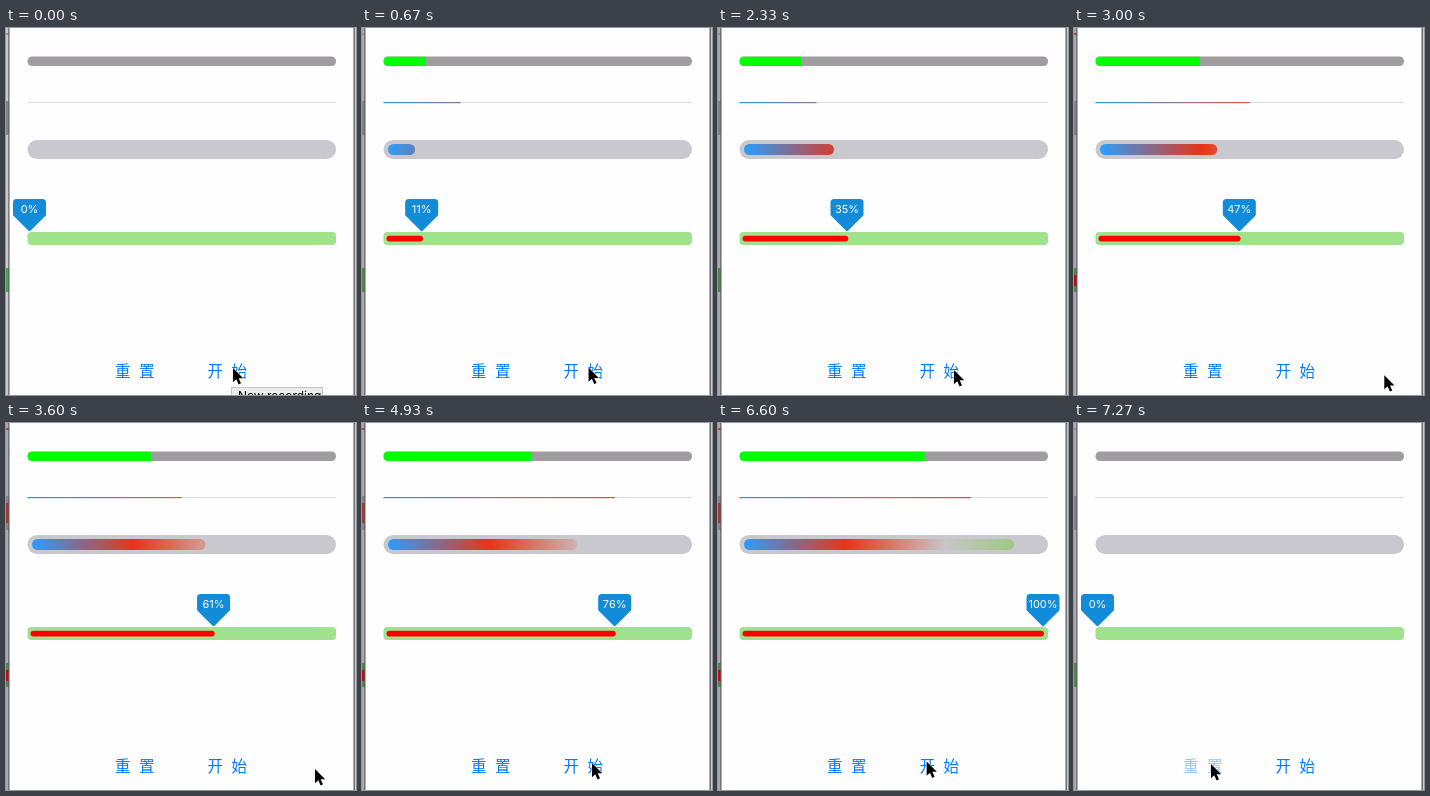
Recreate the animation shown at these times as an HTML page. Size 350 by 367 pixels, loop 7.34 s.

```html
<!DOCTYPE html>
<html lang="zh">
<head>
<meta charset="utf-8">
<title>Progress bars</title>
<style>
  html, body { margin: 0; height: 100%; overflow: hidden; background: #fefdff; }
  svg { display: block; width: 100vw; height: 100vh; }
  .button { font: 15.5px "Noto Sans CJK SC", "Noto Sans CJK", sans-serif; fill: #007aff; }
  #percent { font: 11px Inter, sans-serif; fill: #fff; text-anchor: middle; }
  #tooltip text { font: 12px Inter, sans-serif; }
</style>
</head>
<body>
<svg viewBox="0 0 350 367">
  <defs>
    <clipPath id="thickClip"><rect x="21.5" y="28.5" width="308.5" height="9.5" rx="4.5"/></clipPath>
    <linearGradient id="lineColors" gradientUnits="userSpaceOnUse" x1="21.5" x2="330">
      <stop stop-color="#2b94e0"/><stop offset=".5" stop-color="#dd5a44"/><stop offset="1" stop-color="#b84a3e"/>
    </linearGradient>
    <linearGradient id="pillColors" gradientUnits="userSpaceOnUse" x1="26" x2="326">
      <stop stop-color="#2c9dfa"/><stop offset=".34" stop-color="#e83416"/>
      <stop offset=".67" stop-color="#c8c6c7"/><stop offset="1" stop-color="#8acb62"/>
    </linearGradient>
  </defs>
  <rect width="350" height="367" fill="#fefdff"/>

  <!-- neighbouring window at the left edge -->
  <rect id="edge" width="3" height="367"/>
  <rect id="edgeLine" y="5" width="3" height="2"/>
  <rect y="73" width="3" height="34" fill="#85838a"/>
  <rect id="edgePill" y="80" width="3" height="20" fill="#a5382a"/>
  <rect id="edgeGreen" y="240" width="3" height="24"/>
  <rect id="edgeRed" y="247" width="3" height="11" fill="#c80808"/>
  <rect x="2.3" width="1.2" height="367" fill="#5d5c60"/>
  <rect x="347.5" width="1.4" height="367" fill="#59585c"/>
  <rect x="348.9" width="1.1" height="367" fill="#c9c8cc"/>

  <rect x="21.5" y="28.5" width="308.5" height="9.5" rx="4.5" fill="#9f9d9f"/>
  <rect id="thick" x="21.5" y="28.5" height="9.5" fill="#0f0" clip-path="url(#thickClip)"/>
  <rect x="21.5" y="74" width="308.5" height="1" fill="#dcdbde"/>
  <rect id="line" x="21.5" y="74" height="1.2" fill="url(#lineColors)"/>
  <rect x="21.5" y="112" width="308.5" height="19" rx="9.5" fill="#c9c8ce"/>
  <rect id="pill" x="26" y="116" height="11" rx="5.5" fill="url(#pillColors)"/>
  <rect x="21.5" y="204" width="308.5" height="13" rx="4" fill="#a0e28b"/>
  <rect id="labelled" x="24.5" y="207.7" height="5.8" rx="2.9" fill="#f00"/>

  <g id="marker">
    <path d="M-16.5 174.5q0-3.5 3.5-3.5h26q3.5 0 3.5 3.5v12q0 1-1 1.8L1.2 202.4q-1.2 1-2.4 0L-15.5 188.3q-1-.8-1-1.8z" fill="#128bd8"/>
    <text id="percent" y="185"></text>
  </g>

  <text id="reset" class="button" x="109 133" y="348.5">重置</text>
  <text id="start" class="button" x="201.5 225.5" y="348.5">开始</text>

  <g id="tooltip">
    <rect x="225.5" y="359.5" width="91" height="20" fill="#ececec" stroke="#c4c4c4"/>
    <text x="232" y="372">New recording</text>
  </g>
  <path id="cursor" d="M0 0V14.2L3.3 11.2 5.6 16.4 8 15.3 5.7 10.3H10.2Z" stroke="#fff" stroke-width="1" paint-order="stroke"/>
</svg>
<script>
const LOOP = 7340, RESET = 7100;
const CLICKS = [157, 2485, 4630];
const POINTER = [
  [0, 227, 340], [1500, 226, 339], [1900, 302, 344], [2330, 236, 342], [2450, 231, 341],
  [2640, 231, 341], [3100, 321, 348], [3300, 321, 348], [3600, 309, 346], [4000, 258, 342],
  [4400, 230, 340], [4950, 230, 340], [5500, 270, 338], [5930, 281, 336], [6300, 281, 336],
  [6900, 137, 341], [LOOP, 137, 341]
];

const el = id => document.getElementById(id);
const set = (id, name, value) => el(id).setAttribute(name, value);
const show = (id, visible) => set(id, "visibility", visible ? "visible" : "hidden");
const clamp = v => Math.max(0, Math.min(1, v));
const linear = v => v;
const smooth = v => v * v * (3 - 2 * v);

// Every click raises a bar by one step, up to 100 %.
function level(t, step, duration, ease, delay = 0) {
  if (t >= RESET) return 0;
  return CLICKS.reduce((sum, click, i) => {
    const gain = Math.min(step, 1 - i * step);
    return sum + gain * ease(clamp((t - click - delay) / duration));
  }, 0);
}

function pointerAt(t) {
  const i = POINTER.findIndex(p => p[0] > t);
  const [t0, x0, y0] = POINTER[i - 1], [t1, x1, y1] = POINTER[i];
  const k = smooth((t - t0) / (t1 - t0));
  return [x0 + (x1 - x0) * k, y0 + (y1 - y0) * k];
}

// Dimmed while pressed, then fades back.
const pressOpacity = (t, release) =>
  t < release - 80 ? 1 : .42 + .58 * clamp((t - release - 170) / 150);

function draw(t) {
  const thick = level(t, .2, 750, linear);
  const line = level(t, .25, 250, smooth);
  const pill = level(t, .3, 1275, smooth, 50);
  const labelled = level(t, .35, 1500, linear);

  set("thick", "width", thick * 308.5);
  set("line", "width", line * 308.5);
  set("pill", "width", pill * 300);
  set("labelled", "width", labelled && labelled * 301 + .5);
  set("marker", "transform", `translate(${23.5 + labelled * 301.5} 0)`);
  el("percent").textContent = Math.floor(labelled * 100 + 1e-6) + "%";

  const fresh = t < 140;
  show("tooltip", fresh);
  set("edge", "fill", fresh ? "#cbcacd" : "#aaa9ad");
  set("edgeGreen", "fill", fresh ? "#45a945" : "#4e8a45");
  set("edgeLine", "fill", line > .47 ? "#b0483c" : "#969599");
  show("edgePill", pill > .45);
  show("edgeRed", labelled > .45);

  const lastClick = CLICKS.filter(click => t >= click - 80).pop();
  set("start", "opacity", lastClick ? pressOpacity(t, lastClick - 100) : 1);
  set("reset", "opacity", pressOpacity(t, RESET));
  set("cursor", "transform", `translate(${pointerAt(t)})`);
}

function frame() {
  draw(performance.now() % LOOP);
  requestAnimationFrame(frame);
}
frame();
</script>
</body>
</html>
```
